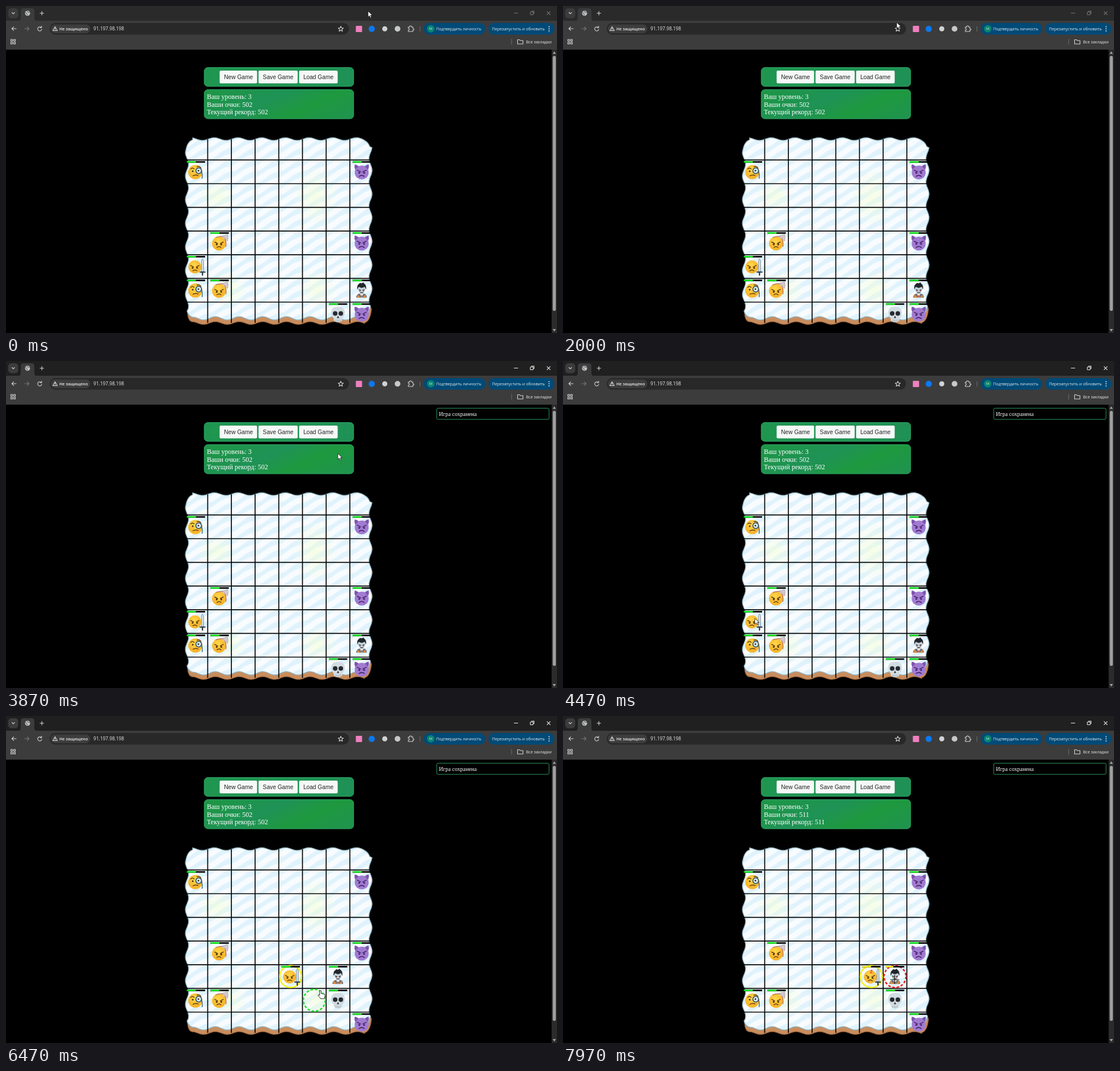
Recreate the animation shown at these times as an HTML page. Size 971x577 px, loop 8000 ms.

```html
<!DOCTYPE html>
<html lang="ru">
<head>
<meta charset="utf-8">
<title>Board game</title>
<style>
html, body { margin: 0; width: 100%; height: 100%; overflow: hidden; background: #000; }
svg { display: block; width: 100%; height: 100%; }
.ui { font: 7.1px "Open Sans", sans-serif; fill: #e8eaed; }
.btn { font: 10.2px "Liberation Sans", Arial, sans-serif; fill: #222; text-anchor: middle; }
.info { font: 12px "Liberation Serif", "Times New Roman", serif; fill: #fff; }
.line { fill: none; stroke: #d5d7d9; stroke-width: 1.1; stroke-linecap: round; stroke-linejoin: round; }
</style>
</head>
<body>
<svg viewBox="0 0 971 577" preserveAspectRatio="none">
<defs>
  <linearGradient id="green1"><stop stop-color="#1f9650"/><stop offset="1" stop-color="#1f9156"/></linearGradient>
  <linearGradient id="green2" x1="0" y1=".3" x2="1" y2=".7">
    <stop stop-color="#1e9648"/><stop offset=".4" stop-color="#1f9256"/>
    <stop offset=".7" stop-color="#1e993e"/><stop offset="1" stop-color="#1f944c"/>
  </linearGradient>
  <radialGradient id="tint"><stop stop-color="#f3ffd2" stop-opacity=".55"/><stop offset="1" stop-color="#f3ffd2" stop-opacity="0"/></radialGradient>
  <radialGradient id="gold" cx=".45" cy=".35"><stop stop-color="#ffd84a"/><stop offset="1" stop-color="#f7b52c"/></radialGradient>
  <pattern id="ice" x="313.7" y="229.9" width="41.75" height="41.8" patternUnits="userSpaceOnUse">
    <rect width="42" height="42" fill="#e0f3fd"/>
    <g id="stripes" fill="none" stroke="#f8fcff" stroke-width="10"/>
  </pattern>
  <clipPath id="clip"><path id="clipShape"/></clipPath>

  <g id="frown" fill="none" stroke="#5a3a16" stroke-width="1.4" stroke-linecap="round">
    <path d="M-7.5-2.5-2.5 0M7.5-2.5 2.5 0M-3.5 7Q0 4 3.5 7"/>
    <circle cx="-4" cy="1.8" r="1" fill="#5a3a16"/><circle cx="4" cy="1.8" r="1" fill="#5a3a16"/>
  </g>
  <g id="monocle">
    <circle cx="-1" cy=".5" r="12.5" fill="url(#gold)"/>
    <path d="M-9-5Q-6-8-3-5M2-9Q6-11 9-7M-5 7Q-1 4.500 4 6.500" fill="none" stroke="#5a3a16" stroke-width="1.4" stroke-linecap="round"/>
    <circle cx="-5.500" cy="-1" r="1.500" fill="#4a3218"/>
    <circle cx="5" cy="-2" r="5" fill="#d9eefa" stroke="#38566b" stroke-width="1.700"/>
    <circle cx="4.500" cy="-2" r="1.500" fill="#4a3218"/>
    <path d="M10-2Q12 5 11 12" fill="none" stroke="#38566b" stroke-width="1.300"/>
  </g>
  <g id="axe">
    <circle cx="-1" cy="1" r="12.300" fill="url(#gold)"/><use href="#frown" x="-1" y="1"/>
    <path d="M-7-9.500Q3-13 8-10Q13-3 11 7" fill="none" stroke="#b5685c" stroke-width="1.300"/>
    <path d="M5-12 14-15Q16-8 14-3L10-7Z" fill="#d3c8cc" stroke="#a98f92" stroke-width=".6"/>
  </g>
  <g id="sword">
    <circle cx="-1.700" cy=".5" r="11.500" fill="url(#gold)"/><use href="#frown" x="-1.700" y=".5"/>
    <path d="M9.700 9V-10L11.700-14 13.700-10V9Z" fill="#b9c8d0" stroke="#71858f" stroke-width=".7"/>
    <path d="M11.700-12V9" stroke="#eef5f8" stroke-width="1"/>
    <path d="M7.500 9.700H16M11.700 10V15" stroke="#263238" stroke-width="2.200" stroke-linecap="round"/>
  </g>
  <g id="devil">
    <path d="M-12-13Q-8-12-5-10Q0-12 5-10Q8-12 12-13Q14-8 11.500-4Q14 4 9 10Q0 17-9 10Q-14 4-11.500-4Q-14-8-12-13Z" fill="#a17bd0"/>
    <path d="M-12-13Q-8-12-6-9L-11-4Q-13-8-12-13ZM12-13Q8-12 6-9L11-4Q13-8 12-13Z" fill="#7d55ad"/>
    <path d="M-8-3-2 0M8-3 2 0M-4.500 8Q0 4.500 4.500 8" fill="none" stroke="#45236b" stroke-width="1.600" stroke-linecap="round"/>
    <circle cx="-4.300" cy="1.800" r="1.600" fill="#45236b"/><circle cx="4.300" cy="1.800" r="1.600" fill="#45236b"/>
  </g>
  <g id="vampire">
    <path d="M-10 13Q-9 6-3 6H3Q9 6 9 13Z" fill="#6d7478"/>
    <path d="M-8 7-2 13H-8ZM7 7 2 13H7Z" fill="#e98a3c"/>
    <path d="M-3 6H3L0 13Z" fill="#f4f4f4"/><path d="M-1.300 9H1.300L0 13Z" fill="#c9452d"/>
    <path d="M-6.500-6H6.500Q7 4 0 7.500Q-7 4-6.500-6Z" fill="#c3d0d6"/>
    <path d="M-7.500-1Q-9-9-5-11L-3-13 0-12 3-14 4-12Q9-9 7.500-1L5.500-6 0-4-5.500-6Z" fill="#20262b"/>
    <path d="M-5-1-1.500 0M5-1 1.500 0M-2.500 4H2.500" stroke="#2d3438" stroke-width="1.300"/>
    <circle cx="-3" cy="1.200" r=".9" fill="#a33"/><circle cx="3" cy="1.200" r=".9" fill="#a33"/>
  </g>
  <g id="skull">
    <path d="M0-13Q12-13 12-2Q12 4 8 7L7 12Q0 17-7 12L-8 7Q-12 4-12-2Q-12-13 0-13Z" fill="#d3dce2"/>
    <circle cx="-5" cy="-1" r="4" fill="#252b30"/><circle cx="5" cy="-1" r="4" fill="#252b30"/>
    <path d="M0 3 2 7H-2Z" fill="#252b30"/><path d="M-3.500 10V13M0 10V14M3.500 10V13" stroke="#8b99a2" stroke-width="1"/>
  </g>
</defs>

<rect width="971" height="577"/>
<rect id="strip" width="971" height="27"/>
<rect y="26" width="971" height="51" fill="#3c3c3c"/>
<path d="M22 26Q26 26 26 21V9Q26 4 31 4H45Q50 4 50 9V21Q50 26 54 26Z" fill="#3c3c3c"/>
<rect x="4" y="4" width="17.500" height="17.500" rx="5.500" fill="#3c3c3c"/>
<g class="line">
  <path d="M10.500 11.500 12.800 13.800 15.100 11.500M60 12.800H66.500M63.200 9.500V16"/>
  <path d="M18 40H10.500M13.500 36.800 10.300 40 13.500 43.200"/>
  <path d="M33 40H40.500M37.500 36.800 40.700 40 37.500 43.200" stroke="#777"/>
  <path d="M62 37.800A3.600 3.600 0 1 0 63 41M62.800 35.500V38.300H60"/>
  <g id="controls"><path d="M895.500 12.500H902"/><rect x="924" y="10.500" width="5" height="5" rx="1"/><path d="M926 9H930.500V13.500M953.500 9.800 959 15.300M959 9.800 953.500 15.300"/></g>
</g>
<circle cx="38" cy="12.800" r="4.500" fill="#bfc3c6"/>
<path d="M34.500 11Q37 14 38 16M37 9Q39 12 42 11" stroke="#55585a" stroke-width="1.100" fill="none"/>
<rect x="77" y="30" width="527.500" height="20.500" rx="10" fill="#282828"/>
<rect x="79" y="32.500" width="69.500" height="15.500" rx="7.700" fill="#3d3d3d"/>
<path class="line" d="M86.500 36.500 90.500 43.500H82.500ZM86.500 39V41M86.500 42.200V42.300"/>
<g class="ui">
  <text x="94" y="42.700" font-weight="600">Не защищено</text>
  <text x="154" y="43.300" style="font-size:8.300px">91.197.98.198</text>
</g>
<path class="line" d="M590 35.700 591.300 38.800 594.600 39 592 41.200 592.900 44.500 590 42.700 587.100 44.500 588 41.200 585.400 39 588.700 38.800Z"/>
<rect x="616.500" y="35" width="11" height="11" rx="1" fill="#f07fc0"/>
<circle cx="644.500" cy="40.300" r="5.500" fill="#0b78f0"/>
<circle cx="667.500" cy="40.300" r="4.500" fill="#d0d2d4"/>
<circle cx="690" cy="40.300" r="5" fill="#c6c8ca"/>
<path class="line" d="M709 37H711.500Q711 35 713 35Q715 35 714.500 37H717V40Q719 40 719 41.300Q719 42.600 717 42.500V45H709V42.500Q711 42.500 711 41Q711 39.500 709 39.500Z"/>
<path d="M729.500 36V45M891 58V68" stroke="#6a6d70"/>
<rect x="736" y="30" width="108.500" height="20.500" rx="10" fill="#004a77"/>
<rect x="850" y="30" width="116.500" height="20.500" rx="10" fill="#004a77"/>
<circle cx="748.500" cy="40.200" r="6.500" fill="#088570"/>
<g class="ui">
  <text x="748.500" y="42.400" text-anchor="middle" style="font-size:6px">М</text>
  <text x="758" y="42.700">Подтвердить личность</text>
  <text x="856.500" y="42.700">Перезапустить и обновить</text>
  <text x="916.500" y="65.700">Все закладки</text>
</g>
<path d="M957 36.500V36.600M957 40.200V40.300M957 43.900V44" stroke="#e8eaed" stroke-width="2" stroke-linecap="round"/>
<path class="line" d="M8.500 59H11.500V62H8.500ZM13.500 59H16.500V62H13.500ZM8.500 64H11.500V67H8.500ZM13.500 64H16.500V67H13.500ZM901.500 59.500H905L906.200 61H911V67H901.500Z"/>

<rect x="961.500" y="77" width="9.500" height="500" fill="#2b2b2b"/>
<rect x="963.500" y="88" width="5.500" height="450" rx="2.700" fill="#9f9f9f"/>
<path d="M963.300 84.500H969.200L966.200 80ZM963.300 570H969.200L966.200 574.500Z" fill="#9f9f9f"/>

<g stroke="#2fa765">
  <rect x="349.300" y="108.500" width="263.400" height="33.400" rx="6.500" fill="url(#green1)"/>
  <rect x="349.300" y="147.500" width="263.400" height="51.500" rx="6.500" fill="url(#green2)"/>
</g>
<g fill="#f6f8f8"><rect x="376.500" y="114" width="66" height="22.500" rx="2"/><rect x="445" y="114" width="69" height="22.500" rx="2"/><rect x="516.500" y="114" width="68" height="22.500" rx="2"/></g>
<g class="btn"><text x="409.700" y="128.800">New Game</text><text x="479.500" y="128.800">Save Game</text><text x="550.500" y="128.800">Load Game</text></g>
<g class="info">
  <text x="354" y="164">Ваш уровень: 3</text><text id="score" x="354" y="177.600"></text><text id="best" x="354" y="191.200"></text>
</g>
<g id="toast"><rect x="759" y="83.300" width="198" height="19.700" rx="2.500" stroke="#2f9a62"/><text class="info" x="763" y="96.600" style="font-size:10px">Игра сохранена</text></g>

<path id="sand" fill="#c98d5d" stroke="#8a5a38" stroke-width="1.200"/>
<path id="board" fill="url(#ice)"/>
<g clip-path="url(#clip)">
  <ellipse cx="372" cy="336" rx="36" ry="30" fill="url(#tint)"/><ellipse cx="544" cy="336" rx="40" ry="55" fill="url(#tint)"/>
  <ellipse cx="390" cy="500" rx="36" ry="36" fill="url(#tint)"/><ellipse cx="548" cy="500" rx="36" ry="36" fill="url(#tint)"/>
</g>
<path id="edge" fill="none" stroke="#8fb4c4" stroke-width="1.300"/>
<path id="grid" stroke="#000" stroke-width="1.700"/>
<circle id="picked" r="19.300" fill="none" stroke="#f4f01a" stroke-width="2.500"/>
<circle id="target" r="19.300" fill="none" stroke-width="2.500" stroke-dasharray="4.700 2.880"/>
<g id="units"/>
<text id="damage" text-anchor="middle" fill="#f03a1c" style="font:bold 9px 'Liberation Sans',sans-serif">2</text>
<g id="cursor">
  <path id="arrow" d="M0 0V10.500L2.500 8.200 4.200 12 6 11.200 4.400 7.500H7.800Z" fill="#fff" stroke="#111" stroke-width=".8"/>
  <path id="hand" d="M-1.300 1Q0-.6 1.300 1V6Q2.500 4.800 3.700 6.200Q5 5.300 6 6.800Q8 6.300 8 8.500V11Q7.500 13 6.500 14.800H.3Q-1 12-4 9.500Q-4.500 7.500-2.500 8L-1.300 9Z" fill="#fff" stroke="#111" stroke-width=".9"/>
  <path id="cross" d="M-8 0H8M0-8V8" stroke="#111" stroke-width="1.100"/>
</g>
</svg>
<script>
const LOOP = 8000, CW = 41.75, CH = 41.8, LEFT = 313.7, TOP = 229.9;
const $ = id => document.getElementById(id);
const set = (el, attrs) => { for (const k in attrs) el.setAttribute(k, attrs[k]); };
const show = (el, on) => set(el, { visibility: on ? 'visible' : 'hidden' });
const center = (c, r) => [LEFT + CW * (c + .5), TOP + CH * (r + .5)];
const clamp = v => Math.max(0, Math.min(1, v));
const wave = (v, peak) => Math.cos((v - peak) * 2 * Math.PI / CW);

// Wavy outlines
function run(from, to, point) {
  let s = '';
  const n = 120;
  for (let i = 0; i <= n; i++) {
    const [x, y] = point(from + (to - from) * i / n);
    s += 'L' + x.toFixed(1) + ' ' + y.toFixed(1);
  }
  return s;
}
const topEdge = run(329, 626, x => [x, 234.800 - 2.400 * wave(x, 367)]);
const rightEdge = y => run(250, y, v => [642.300 + 2.700 * wave(v, 290), v]);
const leftEdge = y => run(y, 258, v => [319 - 2.800 * wave(v, 300), v]);
const iceEnd = run(630, 334, x => [x, 551 - 3 * wave(x, 369)]);
const sandEnd = run(632, 331, x => [x, 559.500 - 2.500 * wave(x, 369)]);
const ring = (y, end) => 'M318 250Q321 239 329 236' + topEdge + 'Q638 239 641 248' + rightEdge(y) +
  (end === iceEnd ? 'Q638 548 630 552' : 'Q642 556 632 559') + end +
  (end === iceEnd ? 'Q322 550 319 538' : 'Q320 558 320 540') + leftEdge(535) + 'Z';
const ice = ring(530, iceEnd);
set($('board'), { d: ice });
set($('clipShape'), { d: ice });
set($('edge'), { d: ice });
set($('sand'), { d: ring(535, sandEnd) });

let lines = '', stripes = '';
for (let i = 1; i < 8; i++) {
  lines += `M${LEFT + CW * i} 235V${559}M318 ${TOP + CH * i}H643`;
}
for (let k = 0; k < 5; k++) stripes += `<path d="M0 ${k * CH / 2 - 6}c13-1 20-17 41.750-20.900"/>`;
set($('grid'), { d: lines });
$('stripes').innerHTML = stripes;

// Units
function unit(type, c, r) {
  const g = document.createElementNS('http://www.w3.org/2000/svg', 'g');
  g.innerHTML = `<use href="#${type}"/><rect x="-16" y="-18.800" width="32.300" height="2.700"/>` +
    '<rect x="-16" y="-18.800" width="16" height="2.700" fill="#12e81c"/>';
  $('units').append(g);
  place(g, c, r);
  return g;
}
const place = (g, c, r) => set(g, { transform: `translate(${center(c, r)})` });
const health = (g, width, hurt) => set(g.lastChild, { width, fill: hurt ? '#f2e61c' : '#12e81c' });

[['monocle', 0, 1], ['devil', 7, 1], ['axe', 1, 4], ['devil', 7, 4],
 ['monocle', 0, 6], ['axe', 1, 6], ['devil', 7, 7]].forEach(u => unit(...u));
const sword = unit('sword', 0, 5), skull = unit('skull', 6, 7), vampire = unit('vampire', 7, 6);

const PATH = [
  [0, 638, 9], [1999, 638, 9], [2000, 588, 29], [2340, 588, 29], [2670, 491, 125],
  [3500, 491, 125], [3670, 598, 149], [3800, 598, 149], [4330, 328, 438], [4470, 338, 454],
  [4799, 338, 454], [4800, 352, 463], [5070, 352, 463], [5130, 347, 462], [5340, 347, 462],
  [5500, 436, 470], [5799, 436, 470], [5800, 465, 462], [6070, 501, 467], [6270, 501, 467],
  [6470, 554, 484], [6600, 549, 496], [6770, 549, 496], [6870, 546, 468], [6960, 546, 468],
  [7300, 584.500, 465], [LOOP, 584.500, 465]
];
function pointer(t) {
  let i = 1;
  while (PATH[i][0] < t) i++;
  const [t0, x0, y0] = PATH[i - 1], [t1, x1, y1] = PATH[i];
  let p = (t - t0) / (t1 - t0);
  p = p * p * (3 - 2 * p);
  return [x0 + (x1 - x0) * p, y0 + (y1 - y0) * p];
}

const MOVES = [5800, 6300, 6930], HIT = 7800;

function draw(t) {
  const active = t >= 2970, selected = t >= 5370;
  const col = [0, 3, 4, 5][MOVES.filter(m => t >= m).length];
  const skullRow = t < MOVES[0] ? 7 : 6;
  const foe = t < MOVES[1] ? [7, 6] : [6, 5];
  const [x, y] = pointer(t);

  set($('strip'), { fill: active ? '#1f201f' : '#292a29' });
  set($('controls'), { stroke: active ? '#f0f0f0' : '#777' });
  set($('toast'), { opacity: clamp((t - 2970) / 60) });
  const points = t < HIT ? 502 : 511;
  $('score').textContent = 'Ваши очки: ' + points;
  $('best').textContent = 'Текущий рекорд: ' + points;

  place(sword, col, 5);
  place(skull, 6, skullRow);
  place(vampire, ...foe);
  health(sword, t < MOVES[2] ? 16 : 15.500, t >= MOVES[2]);
  health(vampire, t < HIT ? 16 : 13, t >= HIT);

  const c = Math.floor((x - LEFT) / CW), r = Math.floor((y - TOP) / CH);
  const onFoe = selected && c === foe[0] && r === foe[1];
  const free = !(c === col && r === 5);
  const [px, py] = center(col, 5), [tx, ty] = center(c, r);
  set($('picked'), { cx: px, cy: py });
  show($('picked'), selected);
  set($('target'), { cx: tx, cy: ty, stroke: onFoe ? '#ee1c1c' : '#16e622' });
  show($('target'), selected && free);

  const since = t - (t >= HIT ? HIT : MOVES[2]), rise = since / 500;
  set($('damage'), { x: px, y: 464 - 30 * rise });
  show($('damage'), rise >= 0 && rise < 1);

  set($('cursor'), { transform: `translate(${x} ${y})` });
  show($('arrow'), t < 4800);
  show($('hand'), t >= 4800 && !onFoe);
  show($('cross'), onFoe);
}

const start = performance.now();
function tick() {
  draw((performance.now() - start) % LOOP);
  requestAnimationFrame(tick);
}
draw(0);
requestAnimationFrame(tick);
</script>
</body>
</html>
```
